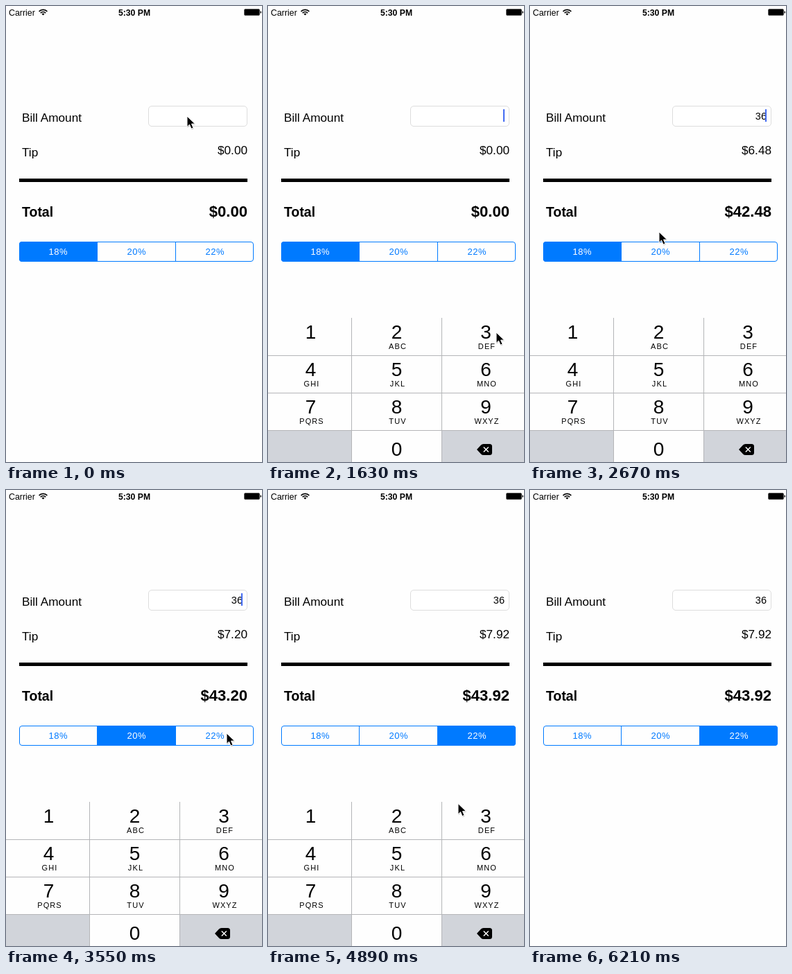
These frames come from a looping animation (369x658 px, 6.36 s). An HTML page:

```html
<!DOCTYPE html>
<html lang="en">
<head>
<meta charset="utf-8">
<title>Tip calculator</title>
<style>
  html, body { margin: 0; width: 100%; height: 100%; overflow: hidden; background: #fefefe; }
  svg { display: block; width: 369px; height: 658px; font-family: "Liberation Sans", Arial, sans-serif; }
  .body { font-size: 17.2px; }
  .bold { font-weight: bold; }
  .end { text-anchor: end; }
  .seg text { font-size: 13px; letter-spacing: .6px; text-anchor: middle; }
  .digit { font-size: 28px; text-anchor: middle; }
  .letters { font-size: 11px; letter-spacing: 1.1px; text-anchor: middle; }
</style>
</head>
<body>
<svg viewBox="0 0 369 658">
  <!-- status bar -->
  <text x="4" y="13.5" font-size="12.4">Carrier</text>
  <g fill="none" stroke="#000" stroke-width="1.7">
    <path d="M47.6 7.8a8.2 8.2 0 0 1 11.8 0M49.8 10.1a5.1 5.1 0 0 1 7.4 0"/>
    <path d="M53.5 13.6l-2-2.1a2.9 2.9 0 0 1 4 0z" fill="#000" stroke="none"/>
  </g>
  <text class="bold" x="185" y="13.5" font-size="12.2" text-anchor="middle">5:30 PM</text>
  <rect x="343.5" y="4.5" width="22" height="9" rx="1.5" fill="#000" stroke="#555"/>
  <path d="M366.5 7.2q1.6 0 1.6 1.8t-1.6 1.8z"/>

  <!-- form -->
  <text class="body" x="23" y="166.5">Bill Amount</text>
  <rect x="205.5" y="144.5" width="142" height="29" rx="4.5" fill="#fff" stroke="#ddd"/>
  <text id="bill" class="end" x="341" y="164" font-size="14.5"></text>
  <rect id="caret" x="339" y="149" width="2" height="18" fill="#426bf2"/>
  <text class="body" x="23" y="216.5">Tip</text>
  <text id="tip" class="body end" x="348" y="214"></text>
  <rect x="19" y="249" width="329" height="5"/>
  <text class="bold" x="23" y="304" font-size="19.5">Total</text>
  <text id="total" class="bold end" x="348" y="304" font-size="22.1"></text>

  <!-- rate picker -->
  <clipPath id="round"><rect x="19" y="340" width="338" height="29" rx="4"/></clipPath>
  <g class="seg">
    <rect id="picked" y="340" width="113" height="29" fill="#007aff" clip-path="none"/>
    <path d="M131.5 340v29M244.5 340v29" stroke="#007aff"/>
    <rect x="19.5" y="340.5" width="337" height="28" rx="3.5" fill="none" stroke="#007aff"/>
    <g id="rates"></g>
  </g>

  <g id="pad"></g>

  <g id="cursor">
    <path d="M0 0v15.4l3.5-3.3 2.5 6 3-1.3-2.5-5.7h5z" transform="translate(.6 1.4)" fill="#000" opacity=".2"/>
    <path d="M0 0v15.4l3.5-3.3 2.5 6 3-1.3-2.5-5.7h5z" stroke="#fff" stroke-width="1"/>
  </g>
</svg>
<script>
const $ = id => document.getElementById(id);
const LOOP = 6360, START = 300, TICK = 147.75, PAD_HEIGHT = 208;
const rates = [18, 20, 22];
const letters = ["", "ABC", "DEF", "GHI", "JKL", "MNO", "PQRS", "TUV", "WXYZ"];

$("picked").parentNode.insertBefore(document.createComment(""), $("picked"));
$("picked").outerHTML = `<g clip-path="url(#round)">${$("picked").outerHTML}</g>`;
$("rates").innerHTML = rates.map((r, i) => `<text x="${75.3 + 113 * i}" y="359.3">${r}%</text>`).join("");

const keys = letters.map((word, i) => {
  const col = i % 3, y = 450 + 54 * Math.floor(i / 3), x = [61.5, 185.5, 314][col];
  return `<text class="digit" x="${x}" y="${y + 30}">${i + 1}</text>
    <text class="letters" x="${x + 1.5}" y="${y + 45}">${word}</text>`;
}).join("");
$("pad").innerHTML = `<rect y="450" width="369" height="208" fill="#fefefe"/>
  <path d="M0 613h120v45H0zM251 613h118v45H251z" fill="#d1d4da"/>
  <rect id="pressed" x="251" width="118" height="53" fill="#d1d4da"/>
  <path d="M120.5 450v208M250.5 450v208M0 504.5h369M0 558.5h369M0 612.5h369" stroke="#b4b5b8"/>
  ${keys}<text class="digit" x="185.5" y="649">0</text>
  <path d="M301 640l6-6.5q1.5-1.5 3.5-1.5h9q3.5 0 3.5 3.5v9q0 3.5-3.5 3.5h-9q-2 0-3.5-1.5z"/>
  <path d="M310.8 636.5l7 7m0-7l-7 7" stroke="#fff" stroke-width="1.4"/>`;

// Pointer waypoints: tick, x, y
const path = [
  [-1, 261, 159], [1, 261, 160], [2, 263, 180], [3, 272, 240], [5, 304, 395], [6, 318, 445],
  [7, 326, 466], [8, 329, 471], [10, 329, 471], [11, 329, 490], [12, 329, 523], [14, 326, 520],
  [15, 270, 407], [16, 186, 326], [17, 181, 345], [18, 184, 352], [20, 190, 352], [21, 255, 352],
  [22, 318, 351], [24, 317, 351], [26, 316, 350], [27, 316, 357], [28, 310, 400], [30, 286, 484],
  [32, 262, 421], [37, 262, 421], [38, 275, 470], [39, 321, 635], [40, 321, 635]
];

function pointer(n) {
  const i = Math.max(1, path.findIndex(p => p[0] >= n));
  const [a, b] = [path[i - 1], path[i]], k = (n - a[0]) / (b[0] - a[0]);
  return [a[1] + (b[1] - a[1]) * k, a[2] + (b[2] - a[2]) * k];
}

const within = (n, ...spans) => spans.some(([from, to]) => n >= from && n < to);
const slide = n => n < 0 ? 0 : [.43, .89][n] ?? 1;
const money = v => "$" + v.toFixed(2);

function draw(ms) {
  const n = Math.floor((ms % LOOP - START) / TICK);
  const tick = Math.max(-1, Math.min(40, n));
  const bill = tick < 11 ? 0 : tick < 14 ? 3 : 36;
  const pick = tick < 19 ? 0 : tick < 24 ? 1 : 2;
  const tip = bill * rates[pick] / 100;

  $("bill").textContent = bill || "";
  $("tip").textContent = money(tip);
  $("total").textContent = money(bill + tip);
  $("picked").setAttribute("x", [19, 131.5, 244][pick]);
  [...$("rates").children].forEach((t, i) => t.setAttribute("fill", i === pick ? "#fff" : "#007aff"));

  $("caret").style.display = within(tick, [0, 4], [7, 18], [21, 25], [28, 31]) ? "" : "none";
  const rise = slide(tick) - slide(tick - 34);
  $("pad").setAttribute("transform", `translate(0 ${Math.round(PAD_HEIGHT * (1 - rise))})`);
  $("pressed").style.display = within(tick, [10, 11], [13, 14]) ? "" : "none";
  $("pressed").setAttribute("y", tick < 12 ? 451 : 505);

  $("cursor").style.display = tick < 40 ? "" : "none";
  $("cursor").setAttribute("transform", `translate(${pointer(tick)})`);
}

const begin = performance.now();
(function frame() {
  draw(performance.now() - begin);
  requestAnimationFrame(frame);
})();
</script>
</body>
</html>
```
